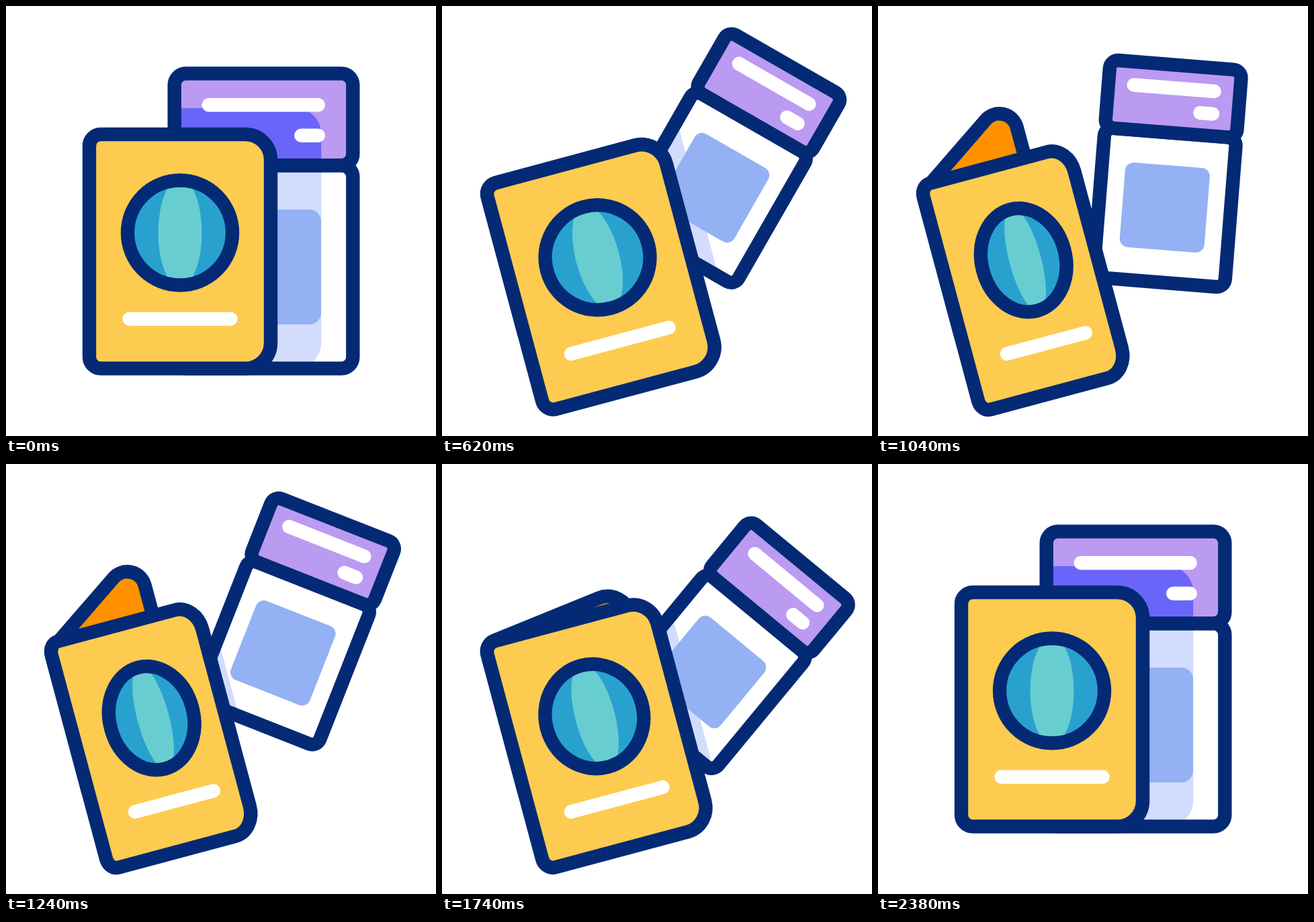
Write an HTML page with a canvas that moves like this. It is 640 px wide and 640 px high and loops after 2.4 s.

```html
<!DOCTYPE html>
<html lang="en">
<head>
<meta charset="utf-8">
<title>Passport and ticket</title>
<style>
  html, body { margin: 0; width: 100%; height: 100%; overflow: hidden; background: #fff; }
  canvas { display: block; width: 640px; height: 640px; }
</style>
</head>
<body>
<canvas id="stage" width="640" height="640"></canvas>
<script>
const ctx = document.getElementById('stage').getContext('2d');
const LOOP = 2400;
const LINE = 20.4;
const NAVY = '#042a75', WHITE = '#fff', YELLOW = '#fdcb50', ORANGE = '#ff9100';
const BLUE = '#29a1ce', TEAL = '#68cdd1', PURPLE = '#bb9af1', VIOLET = '#6a65f9';
const PALE = '#d2dcfc', SKY = '#94b1f3';

// cubic-bezier(.42, 0, .58, 1), solved by bisection
function ease(x) {
  let lo = 0, hi = 1;
  for (let i = 0; i < 24; i++) {
    const u = (lo + hi) / 2, v = 1 - u;
    if (1.26 * u * v * v + 1.74 * u * u * v + u * u * u < x) lo = u; else hi = u;
  }
  return lo * lo * (3 - 2 * lo);
}

// Everything that moves, as sums of eased steps
function pose(t) {
  const step = (from, to) => ease(Math.min(1, Math.max(0, (t - from) / (to - from))));

  const slide = step(200, 600) - step(1960, 2360);
  const turn = step(220, 620) - step(1960, 2360);
  const open = step(600, 1050) - step(1400, 1960);
  const fold = step(600, 1050) - step(1400, 2045);

  const fly = step(200, 600) - step(1800, 2200);
  const spin = step(210, 610) - step(1820, 2220);
  const swing = step(600, 1000) - step(1000, 1400);
  const lean = step(1400, 1800);
  const apart = step(200, 600) - step(1900, 2360);

  return {
    open, fold,
    book: { x: 259 - 20.2 * slide, y: 365.25 + 35.8 * slide, turn: -15 * turn },
    card: {
      x: 383.5 + 47.3 * fly,
      y: 320 + fly * (46 * lean - 93.5) + 23.5 * swing,
      turn: spin * (30 + 10 * lean) - 26 * swing
    },
    cardSize: 1 - 0.261 * fly,
    shade: 65 - apart * (43 + 8 * lean) - 40 * swing
  };
}

// Places a layer whose coordinates are those of its resting position
function place(at, homeX, homeY) {
  ctx.setTransform(1, 0, 0, 1, at.x, at.y);
  ctx.rotate(at.turn * Math.PI / 180);
  ctx.translate(-homeX, -homeY);
}

// Scales the path about a point but leaves the pen width alone
function shape(ax, ay, sx, sy, build) {
  ctx.save();
  ctx.translate(ax, ay);
  ctx.scale(sx, sy);
  ctx.translate(-ax, -ay);
  ctx.beginPath();
  build();
  ctx.restore();
}

function fill(color) {
  ctx.fillStyle = color;
  ctx.fill();
}

function stroke(color) {
  ctx.strokeStyle = color;
  ctx.stroke();
}

function drawCard(s, placeBook, coverRight) {
  const placeCard = () => place(s.card, 383.5, 320);
  const cardShape = build => shape(383.5, 320, s.cardSize, s.cardSize, build);

  function panel(y, h, base, shaded, details) {
    const outline = () => ctx.roundRect(250.7, y, 265.6, h, 17);
    placeCard();
    cardShape(outline);
    fill(base);
    ctx.save();
    ctx.clip();
    placeBook();
    ctx.beginPath();
    ctx.roundRect(60, 152, coverRight + LINE / 2 + s.shade - 60, 387.5, [0, 38, 38, 0]);
    fill(shaded);
    ctx.restore();
    placeCard();
    details();
    cardShape(outline);
    stroke(NAVY);
  }

  function bar(x, y) {
    cardShape(() => { ctx.moveTo(x, y); ctx.lineTo(464.7, y); });
    stroke(WHITE);
  }

  panel(237.3, 302.2, WHITE, PALE, () => {
    cardShape(() => ctx.roundRect(298, 303, 171, 171, 17));
    fill(SKY);
  });
  panel(100.5, 136.8, PURPLE, VIOLET, () => {
    bar(301.7, 147.3);
    bar(439.3, 192.8);
  });
}

function drawBackPage(s) {
  const top = 190.8 + 11 * s.open * s.open;
  const right = 394 - 109 * s.fold;
  const tip = top - 109 * Math.pow(s.open, 1.2);
  ctx.beginPath();
  ctx.moveTo(124, 420);
  ctx.arcTo(124, top, right, tip, 17);
  ctx.arcTo(right, tip, right, 420, 38 - 11 * s.open);
  ctx.lineTo(right, 420);
  ctx.closePath();
  fill(ORANGE);
  stroke(NAVY);
}

function drawCover(s, coverScale) {
  const squeeze = 1 - 0.198 * s.open;
  shape(124, 0, coverScale, 1, () => ctx.roundRect(124, 191, 270, 348.5, [17, 38, 38, 17]));
  fill(YELLOW);
  stroke(NAVY);

  const oval = (x, rx, ry) =>
    shape(181, 0, squeeze, 1, () => ctx.ellipse(x, 337.5, rx, ry, 0, 0, 2 * Math.PI));
  oval(259, 78, 78);
  fill(BLUE);
  oval(259 + 3 * s.open, 32.5 - 3 * s.open, 80);
  fill(TEAL);
  oval(259, 78, 78);
  stroke(NAVY);

  shape(183.5, 0, squeeze, 1, () => { ctx.moveTo(183.5, 465.8); ctx.lineTo(334.5, 465.8); });
  stroke(WHITE);
}

function draw(t) {
  const s = pose(t);
  const coverScale = 1 - 0.16 * s.open;
  const placeBook = () => place(s.book, 259, 365.25);

  ctx.setTransform(1, 0, 0, 1, 0, 0);
  ctx.fillStyle = WHITE;
  ctx.fillRect(0, 0, 640, 640);
  ctx.lineWidth = LINE;
  ctx.lineCap = ctx.lineJoin = 'round';

  drawCard(s, placeBook, 124 + 270 * coverScale);
  placeBook();
  if (s.open > 0) drawBackPage(s);
  drawCover(s, coverScale);
}

function frame() {
  draw(performance.now() % LOOP);
  requestAnimationFrame(frame);
}
draw(0);
requestAnimationFrame(frame);
</script>
</body>
</html>
```
